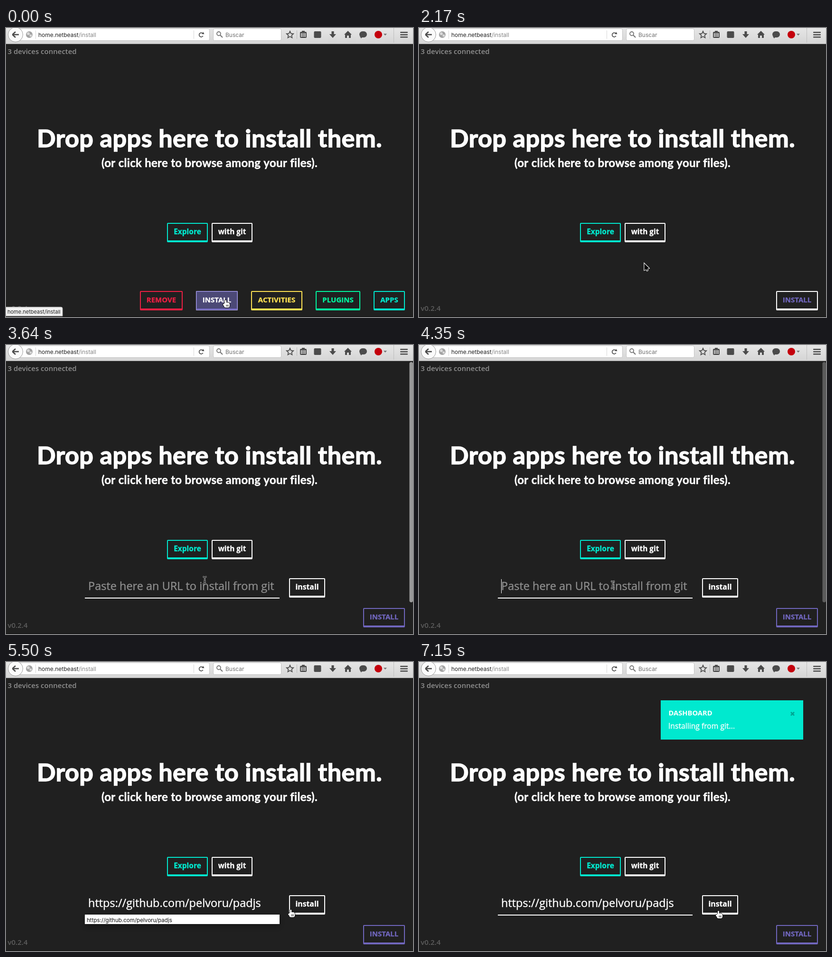
These frames come from a looping animation (857x611 px, 8 s). An HTML page with a canvas:

```html
<!DOCTYPE html>
<html lang="en">
<head>
<meta charset="utf-8">
<title>Install from git</title>
<style>
html, body { margin: 0; width: 100%; height: 100%; overflow: hidden; background: #202020; }
canvas { display: block; }
</style>
</head>
<body>
<canvas id="stage" width="857" height="611"></canvas>
<script>
const ctx = document.getElementById('stage').getContext('2d');
const LOOP = 8000;
const SANS = '"Open Sans", "Noto Sans", sans-serif';
const HEAD = 'Lato, "Open Sans", sans-serif';
const UI = 'Inter, "Liberation Sans", sans-serif';
const DARK = '#202020', WHITE = '#fff', TEAL = '#00e9cf', PURPLE = '#7066bd', ICON = '#4b4b4b';
const REPO = 'https://github.com/pelvoru/padjs';

// moments of the story, in ms
const AT = { leaveNav: 2000, openForm: 3050, focus: 3930, paste: 4880, submit: 6380, toast: 6620 };
const BLINK = 520;

// where the pointer goes next, and when
const MOVES = [
  { from: 1940, to: 2690, x: 483, y: 440 },
  { from: 3250, to: 3930, x: 408, y: 507 },
  { from: 5270, to: 5670, x: 631, y: 526 },
];

const ramp = (t, a, b) => Math.max(0, Math.min(1, (t - a) / (b - a)));
const easeOut = k => 1 - (1 - k) ** 2.3;

function text(str, x, y, font, color, { align = 'left', spacing = 0, bold = 0 } = {}) {
  ctx.font = font;
  ctx.textAlign = align;
  ctx.letterSpacing = spacing + 'px';
  ctx.fillStyle = ctx.strokeStyle = color;
  ctx.fillText(str, x, y);
  if (bold) {
    ctx.lineWidth = bold;
    ctx.strokeText(str, x, y);
  }
}

function rect(x, y, w, h, color) {
  ctx.fillStyle = color;
  ctx.fillRect(x, y, w, h);
}

function paint(fill, stroke, width = 1) {
  if (fill) { ctx.fillStyle = fill; ctx.fill(); }
  if (stroke) { ctx.strokeStyle = stroke; ctx.lineWidth = width; ctx.stroke(); }
}

function round(x, y, w, h, r, fill, stroke) {
  ctx.beginPath();
  ctx.roundRect(x, y, w, h, r);
  paint(fill, stroke);
}

function disc(x, y, r, fill, stroke, width) {
  ctx.beginPath();
  ctx.arc(x, y, r, 0, 7);
  paint(fill, stroke, width);
}

function line(x0, y0, x1, y1, color, width) {
  ctx.beginPath();
  ctx.moveTo(x0, y0);
  ctx.lineTo(x1, y1);
  paint(null, color, width);
}

// triangle with its base centred on x, y; a negative height points up
function wedge(x, y, w, h, color) {
  ctx.beginPath();
  ctx.moveTo(x - w / 2, y);
  ctx.lineTo(x + w / 2, y);
  ctx.lineTo(x, y + h);
  paint(color);
}

function faded(alpha, draw) {
  ctx.save();
  ctx.globalAlpha = alpha;
  draw();
  ctx.restore();
}

function button(label, x, y, w, color, size, ink = color, fill = DARK) {
  round(x, y, w, 41, 2, color);
  rect(x + 2, y + 2, w - 4, 35, fill);
  text(label, x + w / 2, y + 24, `700 ${size}px ${SANS}`, ink, { align: 'center', bold: 0.3 });
}

function focusRing(x, y, w, h) {
  ctx.save();
  ctx.setLineDash([1, 1]);
  ctx.strokeStyle = '#e6e4ff';
  ctx.lineWidth = 1;
  ctx.strokeRect(x + 0.5, y + 0.5, w - 1, h - 1);
  ctx.restore();
}

function addressBar() {
  round(20.5, 1.5, 408, 25, 3, WHITE, '#c2c2c2');
  disc(20, 14, 15.5, '#fbfbfb', '#9b9b9b');
  line(14, 14, 27, 14, ICON, 2.6);
  for (const s of [-1, 1]) line(13.5, 14, 20, 14 + 6 * s, ICON, 2.6);

  disc(49, 14, 7, '#a3a3a3');
  disc(47, 12, 3, '#dadada');
  disc(52, 16, 2.5, '#dadada');
  for (const x of [62, 395]) rect(x, 5, 1, 18, '#d6d6d6');

  const font = `400 12px ${UI}`;
  text('home.netbeast', 68, 19, font, '#222');
  text('/install', 68 + ctx.measureText('home.netbeast').width, 19, font, '#858585');

  ctx.beginPath();
  ctx.arc(411, 14.5, 4.3, 0.5, 5.3);
  paint(null, ICON, 1.8);
  wedge(415, 13, 5, -5, ICON);
}

function searchBar() {
  round(436.5, 1.5, 143, 25, 3, WHITE, '#c2c2c2');
  disc(448, 12, 4, null, '#777', 1.8);
  line(451, 15, 456, 20, '#777', 2.2);
  text('Buscar', 462, 19, `400 12px ${UI}`, '#6f6f6f');
}

function star(x, y) {
  ctx.beginPath();
  for (let i = 0; i < 10; i++) {
    const r = i % 2 ? 3.6 : 7.6, a = (i / 5 - 0.5) * Math.PI;
    ctx.lineTo(x + r * Math.cos(a), y + r * Math.sin(a));
  }
  ctx.closePath();
  paint(null, ICON, 1.7);
}

function toolIcons() {
  star(598, 14.5);

  round(619, 8, 14, 13, 2, ICON);
  rect(623, 6, 6, 4, ICON);
  rect(621, 11, 10, 8, '#e0e0e0');
  for (let y = 12; y < 19; y += 3) rect(622, y, 8, 1.5, ICON);

  round(648.5, 7, 15, 14, 2, ICON);

  rect(685.5, 7, 5, 6, ICON);
  wedge(688, 13, 14, 8, ICON);

  wedge(720, 14, 16, -8, ICON);
  rect(714, 14, 4, 7, ICON);
  rect(722, 14, 4, 7, ICON);
  rect(718, 14, 4, 2, ICON);

  round(744, 7, 16, 13, 6.5, ICON);
  wedge(748, 18, 6, 4, ICON);

  disc(784, 14, 8, '#c4000c');
  wedge(798.5, 12, 7, 4, '#777');
  for (let y = 8; y <= 18; y += 5) round(830, y, 16, 2.6, 1, ICON);
}

function toolbar() {
  const shade = ctx.createLinearGradient(0, 0, 0, 33);
  shade.addColorStop(0, '#e6e6e6');
  shade.addColorStop(1, '#d5d5d5');
  rect(0, 0, 857, 33, shade);
  rect(0, 33, 857, 1, '#a9a9a9');
  addressBar();
  searchBar();
  rect(612, 5, 1, 18, '#b9b9b9');
  rect(816, 0, 1, 31, '#bdbdbd');
  toolIcons();
}

function page() {
  const small = `600 15px ${SANS}`;
  text('3 devices connected', 3.5, 55, small, '#8f8f8f');
  text('v0.2.4', 3.5, 598, small, '#5d5d5d');
  text('Drop apps here to install them.', 428.5, 252, `700 52.3px ${HEAD}`, WHITE,
       { align: 'center', spacing: 0.4, bold: 1.4 });
  text('(or click here to browse among your files).', 428.5, 294, `700 24px ${HEAD}`, WHITE,
       { align: 'center', spacing: 0.28, bold: 0.5 });
  button('Explore', 339, 412, 86, TEAL, 15.5);
  button('with git', 433, 412, 86, WHITE, 15.4);
}

const NAV = [
  { label: 'REMOVE', w: 90, color: '#ee1f43' },
  { label: 'INSTALL', w: 88, color: PURPLE, active: true },
  { label: 'ACTIVITIES', w: 108, color: '#ffe253' },
  { label: 'PLUGINS', w: 94, color: '#00f7a0' },
  { label: 'APPS', w: 66, color: TEAL },
];

function nav(t) {
  if (t >= AT.leaveNav) {
    const focused = t < AT.openForm;
    button('INSTALL', 752, 556, 88, focused ? WHITE : PURPLE, 15, PURPLE);
    return;
  }
  let x = 282;
  for (const { label, w, color, active } of NAV) {
    button(label, x, 556, w, color, 15, active ? WHITE : color, active ? '#4c4976' : DARK);
    if (active) focusRing(x, 556, w, 41);
    x += w + 28;
  }
}

function caret(t) {
  const since = t < AT.paste ? AT.focus : AT.paste;
  const on = t >= AT.focus && t < AT.submit && Math.floor((t - since) / BLINK) % 2 === 0;
  if (on) rect(t < AT.paste ? 173 : 539, 495, 1, 30, WHITE);
}

function suggestion() {
  ctx.shadowColor = 'rgba(0,0,0,.35)';
  ctx.shadowBlur = 14;
  ctx.shadowOffsetY = 5;
  rect(166, 534, 410, 20, WHITE);
  ctx.shadowColor = 'transparent';
  text(REPO, 170, 550, `400 11.6px ${UI}`, '#111');
}

function gitForm(t) {
  if (t < AT.openForm) return;
  const pasted = t >= AT.paste;
  text(pasted ? REPO : 'Paste here an URL to install from git', 173, 518,
       `400 23.5px ${SANS}`, pasted ? WHITE : '#8d8d8d', { bold: 0.4 });
  rect(166, 534, 410, 2, WHITE);
  button('install', 596, 493, 76, WHITE, 15.8);
  caret(t);
  if (pasted) faded(1 - ramp(t, AT.submit - 60, AT.submit + 60), suggestion);
  faded(1 - ramp(t, 4240, 4460), () => round(849.5, 36, 7.5, 508, 4, '#999'));
}

// the label is as dark as the page, so only the plate needs to fade
function status(label, w, alpha) {
  if (alpha <= 0) return;
  faded(alpha, () => round(-2, 590, w + 2, 19, [0, 3, 0, 0], '#f1f1f1', '#b5b5b5'));
  text(label, 3, 604, `400 11px ${UI}`, '#222');
}

function toast(t) {
  if (t < AT.toast) return;
  rect(509, 81, 300, 83, TEAL);
  text('DASHBOARD', 525.5, 113, `700 14.7px ${SANS}`, WHITE);
  text('Installing from git...', 525, 141, `400 15.7px ${SANS}`, WHITE, { bold: 0.3 });
  for (const s of [-1, 1]) line(783, 109.5 - 3.5 * s, 790, 109.5 + 3.5 * s, '#00a593', 2.8);
}

function hand() {
  ctx.beginPath();
  ctx.roundRect(-2, 0, 3, 11, 1.5);
  ctx.roundRect(-4, 5.5, 12, 10.5, 4);
  ctx.roundRect(-6, 8, 5, 4, 2);
  paint(null, '#111', 2);
  paint(WHITE);
  for (let x = 1; x < 6; x += 2) line(x, 10, x, 14, '#222', 0.9);
}

function arrow() {
  ctx.beginPath();
  ctx.lineTo(0, 0);
  ctx.lineTo(0, 14);
  ctx.lineTo(10, 10);
  ctx.closePath();
  paint(null, WHITE, 2.2);
  line(4, 10, 7, 16, WHITE, 4);
  paint();
  line(4, 9, 6.5, 15, '#000', 2);
  wedge(0, 0, 0, 0);
  ctx.beginPath();
  ctx.lineTo(0, 0);
  ctx.lineTo(0, 14);
  ctx.lineTo(10, 10);
  paint('#000');
}

function beam() {
  for (const [color, width] of [['#b5b5b5', 3], ['#1c1c1c', 1.2]]) {
    line(0, -7, 0, 7, color, width);
    line(-2.5, 2.5, 2.5, 2.5, color, width);
    for (const sx of [-1, 1])
      for (const sy of [-1, 1]) line(0, 6.5 * sy, 4 * sx, 8 * sy, color, width);
  }
}

function cursor(t) {
  let x = 463, y = 575;
  for (const m of MOVES) {
    const k = easeOut(ramp(t, m.from, m.to));
    x += (m.x - x) * k;
    y += (m.y - y) * k;
  }
  const formOpen = t >= AT.openForm;
  const overField = formOpen && y > 488 && x < 576;
  const overButton = t < AT.leaveNav || y < 452 || (formOpen && x >= 596);
  ctx.save();
  ctx.translate(x, y);
  (overField ? beam : overButton ? hand : arrow)();
  ctx.restore();
}

function draw(t) {
  rect(0, 0, 857, 611, DARK);
  toolbar();
  page();
  nav(t);
  gitForm(t);
  rect(0, 609, 857, 2, '#181818');
  status('home.netbeast/install', 119, 1 - ramp(t, 1080, 1350));
  status('home.netbeast/install#', 127, ramp(t, 2740, 2905) * (1 - ramp(t, 3370, 3580)));
  toast(t);
  cursor(t);
}

const start = performance.now();
function tick() {
  draw((performance.now() - start) % LOOP);
  requestAnimationFrame(tick);
}
tick();
</script>
</body>
</html>
```
